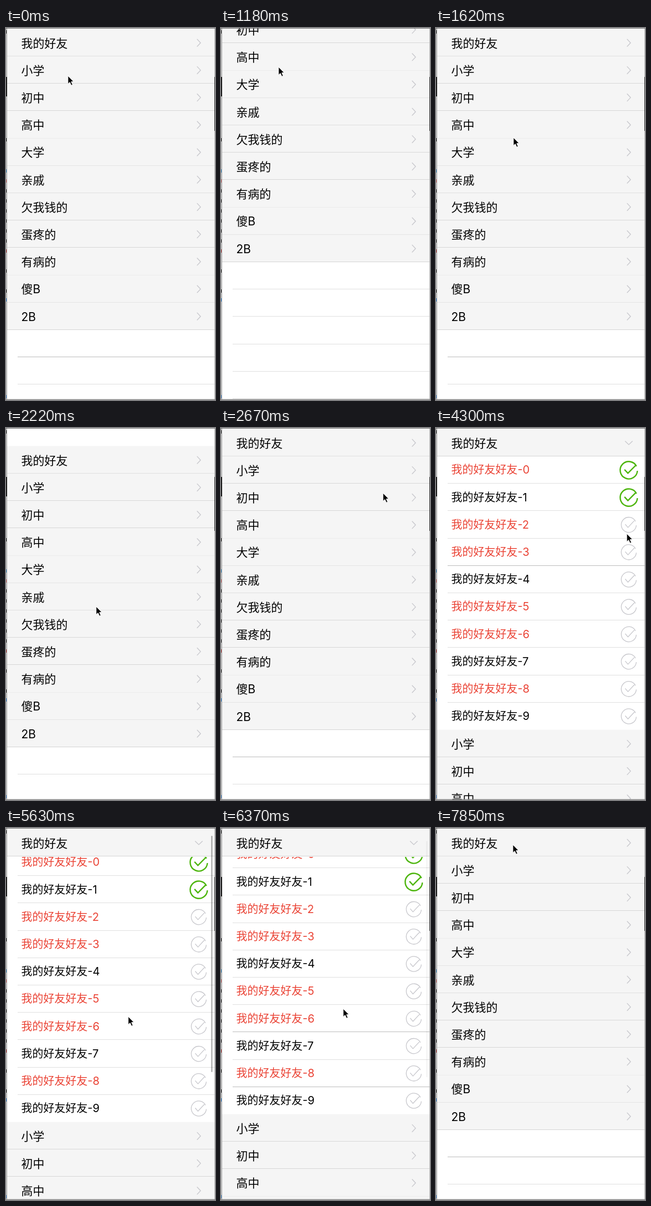
Recreate the animation shown at these times as an HTML page. Size 378x669 px, loop 8 s.

```html
<!DOCTYPE html>
<html lang="zh">
<head>
<meta charset="utf-8">
<title>Grouped list</title>
<style>
  html, body { margin: 0; width: 100%; height: 100%; overflow: hidden; background: #fff; }
  svg { display: block; width: 378px; height: 669px; }
  text { font-family: Inter, "Noto Sans CJK SC", "Noto Sans CJK", sans-serif; fill: #000; }
  .head { font-size: 21px; }
  .row { font-size: 20px; }
  .red { fill: #ea4335; }
  .thin { fill: none; stroke: #c7c7cc; stroke-width: 1.3; }
</style>
</head>
<body>
<svg id="stage" viewBox="0 0 378 669" xmlns="http://www.w3.org/2000/svg">
  <defs>
    <clipPath id="screen"><rect x="2" y="1" width="375" height="667"/></clipPath>
  </defs>
  <rect width="378" height="669" fill="#fff"/>
  <g clip-path="url(#screen)">
    <g id="lines"></g>
    <g id="rows"></g>
    <g id="heads"></g>
    <rect id="bar" x="371" width="2.5" height="425" rx="1.25" fill="#000"/>
  </g>
  <g id="edge"></g>
  <path id="cursor" d="M0 0V14.6L3.4 11.5L6 17.2L8.5 16.1L6 10.6H10.4Z" fill="#000" stroke="#fff" stroke-width="1" stroke-linejoin="round"/>
</svg>
<script>
const LOOP = 8000, TICKS = 54, TOP = 1.5, PITCH = 49.2;
const groups = ['我的好友', '小学', '初中', '高中', '大学', '亲戚', '欠我钱的', '蛋疼的', '有病的', '傻B', '2B'];
const redRows = [0, 2, 3, 5, 6, 8];

const $ = id => document.getElementById(id);
function add(parent, tag, attrs, text) {
  const el = document.createElementNS('http://www.w3.org/2000/svg', tag);
  for (const key in attrs) el.setAttribute(key, attrs[key]);
  if (text) el.textContent = text;
  parent.appendChild(el);
  return el;
}
const place = (el, x, y) => el.setAttribute('transform', `translate(${x} ${y})`);
const rect = (parent, x, y, width, height, fill) => add(parent, 'rect', { x, y, width, height, fill });

// Tracks: [tick, value, ...] with linear motion between keys
const scrollKeys = [[4, 0], [5, 42], [6, 82], [7, 112], [8, 122], [9, 42], [10, 8], [11, 0],
  [12, -8], [13, -45], [14, -60], [15, -31], [16, 0], [37, 0], [39, 28], [50, 28], [51, 18], [52, 4], [53, 0]];
const openKeys = [[18, 0], [19, .45], [20, .9], [21, 1], [50, 1], [51, .5], [52, .1], [53, 0]];
const barKeys = [[34, 0], [35, .3], [42, .3], [43, .04], [44, 0]];
const cursorKeys = [[1, 112, 86], [4, 130, 340], [8, 104, 70], [9, 104, 74], [11, 140, 197], [14, 163, 321],
  [15, 163, 321], [17, 240, 200], [19, 346, 34], [21, 346, 36], [24, 345, 66], [25, 345, 72],
  [27, 345, 122], [29, 345, 190], [30, 345, 190], [35, 221, 353], [37, 221, 353], [39, 221, 325],
  [43, 221, 325], [50, 139, 30]];
const checkTicks = [25, 27];

function track(keys, t) {
  const next = keys.findIndex(k => k[0] > t);
  if (next === 0) return keys[0].slice(1);
  if (next < 0) return keys[keys.length - 1].slice(1);
  const a = keys[next - 1], b = keys[next], u = (t - a[0]) / (b[0] - a[0]);
  return a.slice(1).map((v, i) => v + (b[i + 1] - v) * u);
}

const polar = (r, deg) => {
  const a = deg * Math.PI / 180;
  return `${(r * Math.cos(a)).toFixed(2)} ${(r * Math.sin(a)).toFixed(2)}`;
};
const tick = r => `M${polar(r, 4)}A${r} ${r} 0 1 1 ${polar(r, -27)}`;

const heads = groups.map(name => {
  const g = add($('heads'), 'g', {});
  rect(g, 2, 0, 375, PITCH + .3, '#f5f5f5');
  const line = rect(g, 2, 48, 375, 1, '#d6d6d6');
  const shine = rect(g, 2, 49, 375, 1, '#fcfcfc');
  add(g, 'text', { x: 27.5, y: 33, class: 'head' }, name);
  const arrow = add(g, 'path', { d: 'M-3.2 -6.8L3.2 0L-3.2 6.8', class: 'thin' });
  return { g, line, shine, arrow };
});

const rows = Array.from({ length: 10 }, (_, i) => {
  const g = add($('rows'), 'g', {});
  rect(g, 2, 0, 375, PITCH, '#fff');
  add(g, 'text', { x: 27.5, y: 31.8, class: redRows.includes(i) ? 'row red' : 'row' }, '我的好友好友-' + i);
  const off = add(g, 'path', {
    d: tick(13.6) + 'M-6.5 -1L-1.5 4.8L10 -7.5', class: 'thin', transform: 'translate(348.7 25)'
  });
  const on = add(g, 'path', {
    d: tick(15.6) + 'M-7.8 -1.2L-1.6 5.4L12.2 -8.4', fill: 'none', stroke: '#4cb50c',
    'stroke-width': 2.4, transform: 'translate(348.7 25.2)'
  });
  return { g, off, on };
});

const rowLines = Array.from({ length: 9 }, () => rect($('rows'), 21, 0, 356, 1, '#dedede'));
const blankLines = Array.from({ length: 6 }, () => rect($('lines'), 21, 0, 356, 1, '#e0e0e0'));

// Window border with slivers of the desktop behind it
const edge = $('edge');
rect(edge, 0, 0, 1, 669, '#d9d9d9');
rect(edge, 1, 0, 1, 669, '#9a9a9a');
rect(edge, 377, 0, 1, 669, '#b4b4b4');
rect(edge, 0, 0, 378, 1, '#6e6e6e');
rect(edge, 0, 667.5, 378, 1.5, '#8c8c8c');
rect(edge, 0, 88, 2, 35, '#1c1c1c');
rect(edge, 377, 88, 1, 97, '#1c1c1c');
[[4, '#333'], [198, '#222'], [254, '#3b8fc4'], [272, '#c66'], [290, '#333'], [308, '#333'], [326, '#333'],
 [344, '#333'], [362, '#333'], [380, '#333'], [398, '#a33'], [434, '#333'], [470, '#222'], [486, '#2a7fd0'],
 [660, '#4a8fd0']].forEach(([y, fill]) => rect(edge, 0, y, 1, 6, fill));

function setLine(el, y, dark) {
  el.setAttribute('y', Math.round(y - .8));
  el.setAttribute('fill', dark ? '#bdbdbd' : '#e0e0e0');
}

function placeHead(head, y, angle) {
  place(head.g, 0, y);
  const snap = Math.round(y + 48.4) - y;
  head.line.setAttribute('y', snap);
  head.shine.setAttribute('y', snap + 1);
  head.arrow.setAttribute('transform', `translate(348.7 25.2) rotate(${angle})`);
}

function draw(ms) {
  // The screen refreshes in even steps
  const t = Math.min(TICKS - 1, Math.floor((ms + 18) * TICKS / LOOP));
  const [scroll] = track(scrollKeys, t), [open] = track(openKeys, t);
  const [alpha] = track(barKeys, t), [cx, cy] = track(cursorKeys, t);
  const first = TOP - scroll, body = first + PITCH, second = body + open * 10 * PITCH;
  const darkLines = scroll === 0 ? [5, 12] : scroll === 28 ? [8, 10] : [];

  // The first header sticks to the top while its rows pass below
  placeHead(heads[0], Math.max(first, Math.min(TOP, second - PITCH)), open * 90);
  heads.slice(1).forEach((h, i) => placeHead(h, second + i * PITCH, 0));

  $('rows').style.display = open > 0 ? '' : 'none';
  rows.forEach((r, i) => {
    place(r.g, 0, body + i * PITCH);
    const checked = t >= checkTicks[i];
    r.on.style.display = checked ? '' : 'none';
    r.off.style.display = checked ? 'none' : '';
  });
  rowLines.forEach((l, i) => setLine(l, body + (i + 1) * PITCH, darkLines.includes(i + 2)));

  const end = second + 10 * PITCH;
  blankLines.forEach((l, i) => setLine(l, end + (i + 1) * PITCH, darkLines.includes(i + 12)));

  $('bar').setAttribute('y', 5 + scroll * .65);
  $('bar').setAttribute('opacity', alpha);
  place($('cursor'), cx, cy);
}

const start = performance.now();
function frame() {
  draw((performance.now() - start) % LOOP);
  requestAnimationFrame(frame);
}
frame();
</script>
</body>
</html>
```
